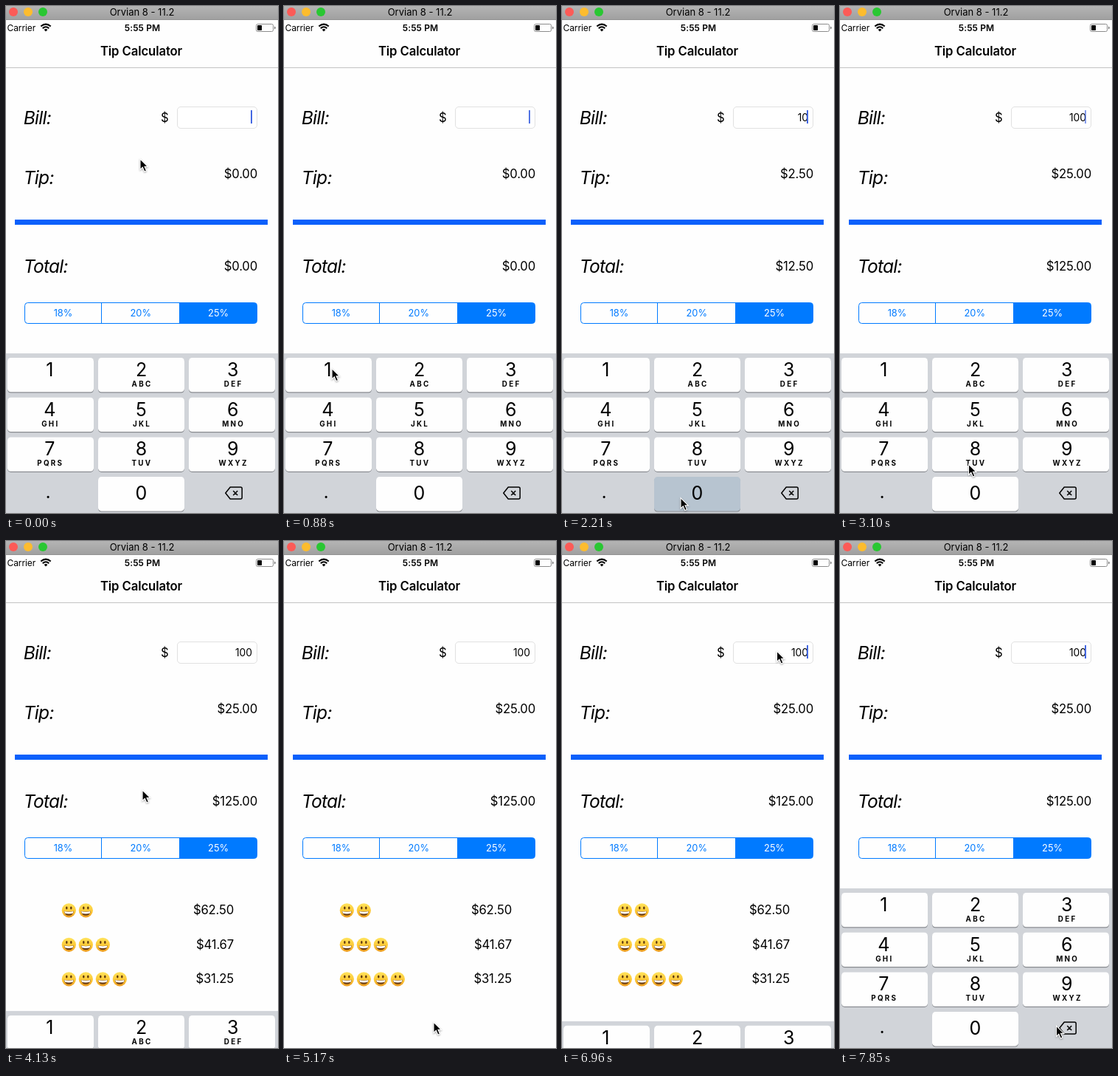
These frames come from a looping animation (369x686 px, 7.99 s). An HTML page:

```html
<!DOCTYPE html>
<html lang="en">
<head>
<meta charset="utf-8">
<title>Tip Calculator</title>
<style>
html, body { margin: 0; width: 100%; height: 100%; overflow: hidden; background: #fefefe; }
svg { display: block; width: 100vw; height: 100vh; }
text { font-family: Inter, Roboto, "Liberation Sans", sans-serif; fill: #000; white-space: pre; }
.amount { font-size: 16.7px; letter-spacing: -.2px; text-anchor: end; }
.label { font-size: 24.5px; font-style: italic; letter-spacing: -.7px; }
.mid { text-anchor: middle; }
.digit { font-size: 25px; text-anchor: middle; }
.letters { font-size: 9.8px; font-weight: 700; letter-spacing: 2.3px; text-anchor: middle; }
</style>
</head>
<body>
<svg viewBox="0 0 369 686">
  <defs>
    <linearGradient id="bar" x2="0" y2="1">
      <stop stop-color="#b4b4b4"/><stop offset="1" stop-color="#9f9f9f"/>
    </linearGradient>
    <linearGradient id="skin" x2="0" y2="1">
      <stop stop-color="#ffe35c"/><stop offset=".6" stop-color="#fcc633"/><stop offset="1" stop-color="#ec9a22"/>
    </linearGradient>
    <g id="face">
      <circle r="9.6" fill="url(#skin)"/>
      <ellipse cx="-3" cy="-3.2" rx="1.2" ry="2" fill="#5b3510"/>
      <ellipse cx="3" cy="-3.2" rx="1.2" ry="2" fill="#5b3510"/>
      <path d="M-6.6 1Q0 2.3 6.6 1Q5.7 7 0 7T-6.6 1Z" fill="#6b3c12"/>
      <path d="M-6.2 1.2Q0 2.5 6.2 1.2L5.3 4Q0 5.2-5.3 4Z" fill="#fff"/>
    </g>
  </defs>
  <rect width="369" height="686" fill="#fefefe"/>

  <rect width="369" height="19" fill="url(#bar)"/>
  <rect y="18" width="369" height="1" fill="#929292"/>
  <circle cx="10" cy="8" r="6" fill="#fc5b57"/>
  <circle cx="30" cy="8" r="6" fill="#fdbc2e"/>
  <circle cx="50" cy="8" r="6" fill="#29c732"/>
  <text class="mid" x="184.5" y="13" font-size="13">Orvian 8 - 11.2</text>

  <text x="1.5" y="33.5" font-size="12" letter-spacing="-.1">Carrier</text>
  <path d="M47.3 27.6Q54 21.6 60.7 27.6M49.7 30.2Q54 26.2 58.3 30.2" fill="none" stroke="#000" stroke-width="2"/>
  <path d="M51.6 32Q54 30 56.4 32L54 34.5Z"/>
  <text class="mid" x="185" y="33.5" font-size="12" font-weight="600" letter-spacing=".1">5:55 PM</text>
  <rect x="339.5" y="24.5" width="23" height="10" rx="2" fill="none" stroke="#8c8c8c"/>
  <rect x="341" y="26" width="6" height="7" rx=".8"/>
  <path d="M364 27.5q1.7 .5 1.7 2t-1.7 2Z" fill="#777"/>

  <text class="mid" x="183.5" y="67" font-size="16.7" font-weight="600" letter-spacing="-.1">Tip Calculator</text>
  <rect y="83" width="369" height="1" fill="#c4c4c4"/>

  <text class="label" x="23.7" y="160">Bill:</text>
  <text class="label" x="23.7" y="241">Tip:</text>
  <text class="label" x="23.7" y="361">Total:</text>
  <text x="210" y="157" font-size="16.7">$</text>
  <rect x="232.5" y="136.5" width="108" height="29" rx="4.5" fill="#fff" stroke="#e1e1e1"/>
  <text id="bill" x="334" y="156" font-size="13.8" text-anchor="end"></text>
  <rect id="caret" x="332" y="141" width="2" height="18" fill="#4468e2"/>
  <text id="tip" class="amount" x="341" y="233"></text>
  <rect x="12" y="289" width="343" height="7" fill="#0b60fb"/>
  <text id="total" class="amount" x="341" y="358"></text>

  <path d="M235.5 401.5H336.5a4 4 0 0 1 4 4V425.5a4 4 0 0 1-4 4H235.5Z" fill="#007aff"/>
  <rect x="25.5" y="401.5" width="315" height="28" rx="4" fill="none" stroke="#007aff"/>
  <path d="M129.5 402V429M235.5 402V429" stroke="#007aff"/>
  <g id="rates"></g>
  <g id="splits"></g>
  <g id="keyboard"><rect y="470" width="369" height="220" fill="#d1d4d9"/></g>
  <path id="pointer" d="M0 0V14.4L3.3 11.3L5.8 17L8.4 15.9L6 10.4H10.4Z"
    stroke="#fff" stroke-width="1.1" style="filter:drop-shadow(0 1px 1px rgba(0,0,0,.35))"/>
</svg>
<script>
const LOOP = 7990, TICK = 147.7, HOLD = 140, SLIDE = 250;
const $ = id => document.getElementById(id);
const add = (id, markup) => $(id).insertAdjacentHTML('beforeend', markup);
const money = v => '$' + v.toFixed(2);
const clamp = v => Math.min(1, Math.max(0, v));

['18%', '20%', '25%'].forEach((rate, i) => add('rates',
  `<text class="mid" x="${77.5 + 105.3 * i}" y="420" font-size="12.8"
    style="fill:${i == 2 ? '#fff' : '#007aff'}">${rate}</text>`));

const groups = [2, 3, 4];
groups.forEach((n, i) => {
  const y = 499.8 + 46.5 * i;
  for (let k = 0; k < n; k++) add('splits', `<use href="#face" x="${85.3 + 23 * k}" y="${y}"/>`);
  add('splits', `<text class="amount" id="share${n}" x="309" y="${y + 5.5}"></text>`);
});

function addKey(digit, letters, col, row) {
  const x = 2 + 123 * col, y = 476 + 53.7 * row, mid = x + 58.5 + 1.2 * (col - 1);
  add('keyboard', `<rect x="${x}" y="${y + 1}" width="117" height="46.5" rx="4.5" fill="#898c91"/>
    <rect id="key${digit}" x="${x}" y="${y}" width="117" height="46.3" rx="4.5" fill="#fefefe"/>
    <text class="digit" x="${mid}" y="${y + (letters === null ? 31 : 25)}">${digit}</text>
    <text class="letters" x="${mid + 1}" y="${y + 39}">${letters || ''}</text>`);
}
' ABC DEF GHI JKL MNO PQRS TUV WXYZ'.split(' ')
  .forEach((s, i) => addKey(i + 1, s, i % 3, Math.floor(i / 3)));
addKey(0, null, 1, 3);
add('keyboard', `<text class="digit" x="57" y="665.5">.</text>
  <path d="M304.2 651H318.2a2 2 0 0 1 2 2V665a2 2 0 0 1-2 2H304.2L297.8 659Z M308.2 656l6 6m0-6l-6 6"
    fill="none" stroke="#000" stroke-width="1.5" stroke-linejoin="round"/>`);

const taps = [{ at: 1030, digit: 1 }, { at: 2210, digit: 0 }, { at: 2500, digit: 0 }];
const hideAt = 4006, showAt = 6920;

// Pointer moves: start, duration, destination
const moves = [
  [150, 590, 65, 490.5], [1030, 150, 65, 607], [1180, 600, 161, 665.5],
  [2960, 140, 174.5, 620], [3100, 590, 185, 337], [4130, 450, 240, 497],
  [4580, 590, 203, 651], [5170, 1040, 291.5, 149], [7100, 600, 293.5, 656]
];

function pointerAt(t) {
  let x = 182, y = 207;
  for (const [start, duration, toX, toY] of moves) {
    const u = clamp((t - start) / duration), e = u * u * (3 - 2 * u);
    x += (toX - x) * e;
    y += (toY - y) * e;
  }
  return [x, y];
}

// Share of an ease-out keyboard slide done by time t
const slide = (t, start) => 1 - (1 - clamp((t - start) / SLIDE)) ** 2;

// The blink restarts at each key release and when the field regains focus
function caretAt(t) {
  if (t > hideAt && t < showAt) return 0;
  const restarts = [0, ...taps.map(tap => tap.at + HOLD), showAt];
  const age = t - Math.max(...restarts.filter(r => r <= t));
  return clamp(1 + 3 * Math.sin(2 * Math.PI * age / 890));
}

function draw(time) {
  // The screen refreshes on a coarse beat
  const t = Math.floor((time + 8) / TICK) * TICK;
  const typed = taps.filter(tap => tap.at <= t);
  const bill = typed.map(tap => tap.digit).join('');
  const total = bill * 1.25;
  $('bill').textContent = bill;
  $('tip').textContent = money(bill * .25);
  $('total').textContent = money(total);
  groups.forEach(n => $('share' + n).textContent = money(total / n));
  $('caret').setAttribute('opacity', caretAt(t));
  [0, 1].forEach(digit => {
    const down = typed.some(tap => tap.digit === digit && t < tap.at + HOLD);
    $('key' + digit).setAttribute('fill', down ? '#b7c4d0' : '#fefefe');
  });
  const drop = 216 * (slide(t, hideAt) - slide(t, showAt));
  $('keyboard').setAttribute('transform', `translate(0 ${drop})`);
  $('pointer').setAttribute('transform', `translate(${pointerAt(t)})`);
}

const start = performance.now();
function frame() {
  draw((performance.now() - start) % LOOP);
  requestAnimationFrame(frame);
}
frame();
</script>
</body>
</html>
```
